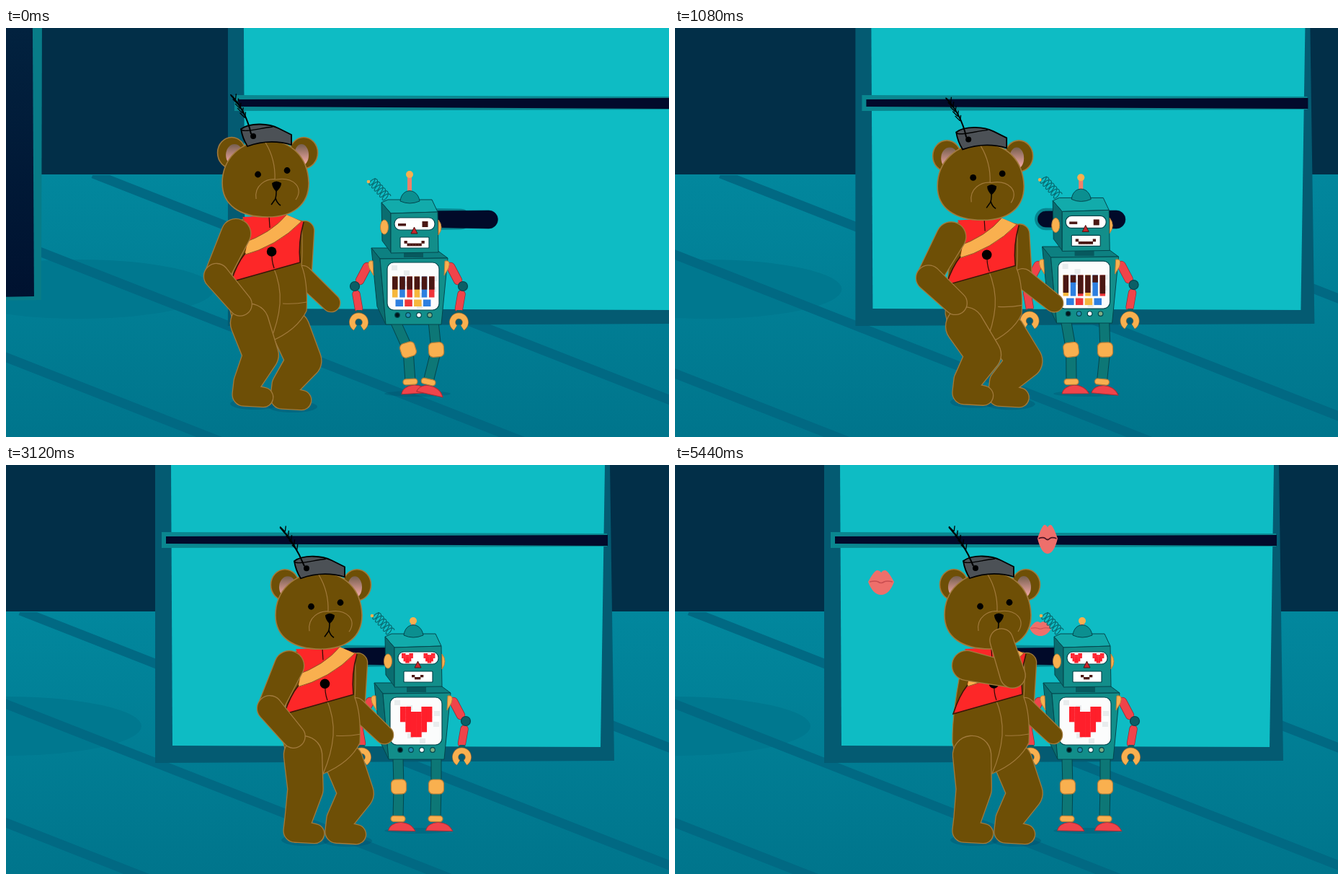
An HTML page with a canvas that plays this animation: 920 px wide and 567 px high, repeating every 5480 ms.

```html
<!DOCTYPE html>
<html lang="en">
<head>
<meta charset="utf-8">
<title>Bear and robot</title>
<style>
html, body { margin: 0; width: 100%; height: 100%; overflow: hidden; background: #022f48; }
canvas { display: block; }
</style>
</head>
<body>
<canvas id="stage" width="920" height="567"></canvas>
<script>
const c = document.getElementById('stage').getContext('2d');
const LOOP = 5480, HEARTS_AT = 2100, TAU = Math.PI * 2;
const FUR = '#6e4f06', SEAM = '#a17a3c', TEAL = '#128e8a', DARK = '#0a6d70', INK = '#04464d',
  GOLD = '#f9b04f', RIM = '#b9803a', RED = '#f0444a', BROWN = '#4a1713', HEART = '#ff1f2b';

// ---- motion ----
const clamp = u => Math.max(0, Math.min(1, u));
function ramp(t, from, to) {
  const u = clamp((t - from) / (to - from));
  return u * u * (3 - 2 * u);
}
const mix = (a, b, u) => a + (b - a) * u;
const mixPoint = (p, q, u) => [mix(p[0], q[0], u), mix(p[1], q[1], u)];

// middle joint of a two-bone limb of lengths a and b; side picks the bend
function bend([x, y], [X, Y], a, b, side) {
  const dx = X - x, dy = Y - y, d = Math.min(Math.hypot(dx, dy), a + b);
  const along = (a * a - b * b + d * d) / (2 * d);
  const out = side * Math.sqrt(Math.max(0, a * a - along * along));
  return [x + (dx * along - dy * out) / d, y + (dy * along + dx * out) / d];
}

// ---- drawing helpers ----
function draw(path, fill, stroke, width = 1.2) {
  if (typeof path === 'string') path = new Path2D(path);
  if (fill) { c.fillStyle = fill; c.fill(path); }
  if (stroke) { c.strokeStyle = stroke; c.lineWidth = width; c.stroke(path); }
}
function oval(x, y, rx, ry, fill, stroke, width) {
  const p = new Path2D();
  p.ellipse(x, y, rx, ry, 0, 0, TAU);
  draw(p, fill, stroke, width);
}
const dot = (x, y, r, fill, stroke) => oval(x, y, r, r, fill, stroke);
function box(x, y, w, h, r, fill, stroke) {
  const p = new Path2D();
  p.roundRect(x, y, w, h, r);
  draw(p, fill, stroke);
}
function rect(x, y, w, h, fill) { c.fillStyle = fill; c.fillRect(x, y, w, h); }
function line(x1, y1, x2, y2, color, width) { draw(`M${x1},${y1}L${x2},${y2}`, null, color, width); }
const poly = (pts, fill, stroke, width) => draw(`M${pts}Z`, fill, stroke, width);
function fade(y1, y2, from, to) {
  const g = c.createLinearGradient(0, y1, 0, y2);
  g.addColorStop(0, from);
  g.addColorStop(1, to);
  return g;
}

// tapered limb through [x, y, radius] joints, outlined as one shape
function limb(joints, fill = FUR, stroke = SEAM, width = 1.3) {
  const p = new Path2D();
  for (let i = 1; i < joints.length; i++) {
    const [x, y, r] = joints[i - 1], [X, Y, R] = joints[i];
    const a = Math.atan2(Y - y, X - x);
    const b = Math.acos(Math.max(-1, Math.min(1, (r - R) / Math.hypot(X - x, Y - y))));
    const q = new Path2D();
    q.arc(x, y, r, a + b, a - b + TAU);
    q.arc(X, Y, R, a - b, a + b);
    q.closePath();
    p.addPath(q);
  }
  draw(p, null, stroke, width * 2);
  draw(p, fill);
}
function pixels(rows, x, y, w, h, color) {
  rows.forEach((row, j) => [...row].forEach((on, i) => {
    if (on === '#') rect(x + i * w, y + j * h, w + .3, h + .3, color);
  }));
}
const HEART_ROWS = ['##..##', '######', '######', '.####.', '.####.', '..##..'];

// ---- room ----
function room(t) {
  const pan = t < 1520 ? mix(101, 20, t / 1520) : 20 * clamp((2300 - t) / 780) ** 2;
  rect(0, 0, 920, 204, '#022f48');
  rect(0, 203, 920, 364, fade(203, 567, '#02879d', '#00758c'));
  c.save();
  c.translate(pan, 0);
  oval(0, 362, 188, 41, '#00788f');
  c.save();
  c.beginPath();
  c.rect(-110, 204, 1040, 363);
  c.clip();
  for (const x of [-750, -330, 20, 436]) line(x, 202, x + 1000, 594, '#016983', 13);
  c.restore();
  poly('-120,0 -51,0 -52,377 -120,378', '#087c88');
  poly('-120,0 -64,0 -62,372 -120,373', fade(0, 372, '#02223f', '#001230'));
  poly('207,0 838,0 844,410 207,413', '#045b72');
  poly('229,0 831,0 825,391 231,389', '#0ebcc4');
  poly('216,93 834,95 834,113 216,115', '#0a8790');
  poly('222,99 835,97 835,112 222,109', '#020a2b');
  limb([[471, 265, 15], [530, 265, 14]], '#078590', '#078590', .3);
  limb([[471, 265, 11], [569, 265.5, 12.5]], '#010a29', '#010a29', .3);
  c.restore();
}

// ---- robot ----
function robotLeg(hip, knee, ankle) {
  for (const [color, width] of [[INK, 15], ['#0d7776', 13]]) {
    draw(`M${hip},406L${knee},446L${ankle},490`, null, color, width);
  }
  c.save();
  c.translate(knee, 446);
  c.rotate((hip - knee) / 60);
  box(-10.5, -10, 21, 20, 6, GOLD, RIM);
  c.restore();
  c.save();
  c.translate(ankle, 491);
  c.rotate((knee - ankle) / 50);
  draw('M-13,16C-11,2 16,-1 24,16Z', RED, '#b02c35', 1);
  box(-10, -4.5, 20, 8, 4, GOLD, RIM);
  c.restore();
}
function robotArm(side) {
  const x = 563 + side * 51, elbow = x + side * 24, claw = x + side * 18.5;
  limb([[x + side * 7, 328, 5.5], [elbow - side * 7, 347, 5.5]], RED, '#8e2c35', .7);
  limb([[elbow - side * 2, 366, 5], [claw, 386, 5]], RED, '#8e2c35', .7);
  draw(`M${x - side},320Q${x + side * 8},318 ${x + side * 4},330L${x - side * 2},340Z`, GOLD, RIM, 1);
  dot(elbow, 355, 6.5, '#0b5f66', INK);
  poly(`${claw - 7},396 ${claw - 3},388 ${claw + 4},388 ${claw + 7},396`, '#0b5f66');
  const ring = new Path2D();
  ring.arc(claw, 405, 9, TAU * .34, TAU * 1.16);
  draw(ring, null, '#8d6a3c', 9);
  draw(ring, null, GOLD, 7.5);
}
function screen(t, love) {
  box(533, 322, 72, 66, 9, '#fbfcfc', INK);
  for (let i = 0; i < 9; i++) rect(539 + i * 37 % 56, 326 + i * 23 % 54, 8, 7, '#e8eced');
  if (love) return pixels(HEART_ROWS, 547, 335, 7.35, 7, HEART);
  const hues = ['#f6b73c', '#2d7fe0', '#f0353a'];
  for (let i = 0; i < 6; i++) {
    const x = 540 + i * 10.2, h = 18 + 8 * Math.sin(t / 150 * (1 + i % 3 / 2));
    rect(x, 341.5, 7.5, 29, hues[i % 3]);
    rect(x, 341.5, 7.5, h, BROWN);
    if (i < 4) rect(544.5 + i * 12.8, 373.5, 10.5, 9.5, hues[(i + 1) % 3]);
  }
}
function spring() {
  const p = new Path2D();
  for (let k = 0; k <= 100; k++) {
    const u = k / 100, a = u * TAU * 6;
    p.lineTo(512 + u * 22 + 5 * Math.cos(a), 207 + u * 25 + 4.5 * Math.sin(a) - 3 * Math.cos(a));
  }
  draw(p, null, '#07656b', 1.1);
  dot(508, 209, 2.3, GOLD);
}
function robotHead(love, ball) {
  spring();
  poly('526,238 535,234 596,234 604,251 539,253', '#12abab', INK, 1);
  poly('526,238 539,253 539,307 527,291', DARK, INK, 1);
  poly('539,253 604,251 605,307 539,308', TEAL, INK, 1);
  oval(530, 272, 5.5, 10, GOLD, RIM, 1);
  draw('M605,262Q613,272 605,283Z', GOLD, RIM, 1);
  line(565, ball, 565, 226, '#ef806a', 6);
  dot(565, ball, 5, GOLD);
  draw('M552,236C554,217 576,217 579,236Q565,242 552,236Z', '#0b8f90', INK, 1);
  box(544, 259, 56, 17, 8, '#fff', INK);
  box(552, 286, 40, 15, 1, '#fff', INK);
  if (love) {
    for (const x of [549, 579.5]) pixels(HEART_ROWS, x, 261, 2.6, 2.2, HEART);
    pixels(['#..#', '.##.'], 563, 291, 4, 3, BROWN);
  } else {
    rect(549, 267, 11, 3.5, BROWN);
    rect(582.5, 264, 8, 8, BROWN);
    pixels(['#.....#', '.#####.'], 557.5, 291, 4, 3.5, BROWN);
  }
  poly('571.5,272 576,281 567,281', '#c9252c', BROWN, 1);
}
function robot(t) {
  const love = t >= HEARTS_AT;
  const sway = Math.cos(TAU * t / 510) * clamp(1 - t / 2100);
  const fore = Math.max(sway, 0), back = Math.max(-sway, 0), lift = Math.abs(sway);
  oval(571, 507, 46, 4, 'rgba(0,70,95,.25)');
  robotLeg(544 - 4 * sway, 545 + 13 * fore + 7 * back, 544 + 17 * fore);
  robotLeg(597 - 4 * sway, 597 + 24 * back, 596 - 10 * sway);
  c.save();
  c.translate(-4 * sway, 3 * lift);
  poly('511,302 598,302 617,316 523,317', '#0d8081', INK, 1);
  rect(556, 306, 27, 9, '#07595e');
  poly('511,302 523,317 531,408 519,383', DARK, INK, 1);
  poly('523,317 617,316 608,408 531,408', TEAL, INK, 1);
  robotArm(-1);
  robotArm(1);
  screen(t, love);
  ['#02161c', '#248fb5', '#fff', '#80ad84'].forEach((k, i) => dot(547 + i * 15, 395, 3.3, k, INK));
  c.translate(-sway, lift);
  robotHead(love, 216 - 17 * Math.sqrt(lift));
  c.restore();
}

// ---- bear ----
function bearLeg(hip, [ax, ay]) {
  const knee = bend(hip, [ax, ay], 47, 42, -1);
  limb([[...hip, 26], [...knee, 24], [ax, ay, 18.5], [ax - 5, ay + 17, 15.5], [ax + 22, ay + 21, 13]]);
}
function torso() {
  draw('M402,258L484,260Q486,300 484,322Q493,345 491,385Q478,412 440,428Q390,420 385,385Q384,340 402,258Z', FUR, SEAM);
  draw('M444,322Q456,350 454,375Q452,400 440,428M458,375Q475,376 491,373', null, SEAM);
  const vest = new Path2D('M402,255L463,252L487,262Q479,290 482,318L386,345Q394,320 406,305L412,275Z');
  draw(vest, '#fd2728');
  c.save();
  c.clip(vest);
  draw('M464,251Q442,278 400,292L400,309Q450,296 484,261Z', GOLD, '#8f5526', 1);
  c.restore();
  draw('M487,262Q479,290 482,318L386,345Q394,320 406,305', null, '#3a1608', 1.6);
  draw('M439,255L440,270M443,303Q442,315 446,326', null, '#2a0b05');
  dot(442.5, 303, 6.8, '#000');
}
function hat(sway) {
  draw('M400,133C414,123 440,126 452,132L470,141L470,155Q440,146 409,157Q402,146 400,133Z', '#4c5156', '#000', 1.8);
  draw('M400,133C402,139 425,132 444,130', null, '#000', 1.4);
  dot(417, 143, 4, '#000');
  const tip = 380 + 6 * sway;
  draw(`M414,140Q${tip + 21},108 ${tip},86`, null, '#000', 2);
  for (let i = 1; i < 6; i++) {
    const [x, y] = mixPoint([tip, 86], [409, 130], i / 7);
    draw(`M${x + 3},${y}l-7,-7m7,7l1,-8`, null, '#000', 1.3);
  }
}
function bearHead(sway) {
  for (const [x, inner, width] of [[387, 391, 12], [487, 484, 10]]) {
    oval(x, 166, 19.5, 21.5, FUR, SEAM, 1.6);
    oval(inner, 169, width, 15, fade(152, 184, '#6d5a48', '#ffb0ae'));
  }
  draw('M436,149C470,149 493,172 494,208C494,238 472,255 437,255C398,255 374,238 374,208C374,174 400,149 436,149Z', FUR, SEAM, 1.6);
  draw('M434,152Q448,175 447,203M421,230C418,211 435,201 449,203C472,199 488,214 476,231', null, SEAM);
  dot(423.5, 196, 4.4, '#000');
  dot(464, 190.5, 4.4, '#000');
  draw('M443,208Q449,203 456,208Q456,214 449,220Q443,214 443,208Z', '#000');
  draw('M449,218Q449,228 447,231L442,238M448,229Q450,236 455,239', null, '#000', 1.5);
  hat(sway);
}
function bear(t) {
  const dip = t < 1690 ? Math.sin(Math.PI * t / 338) ** 2 : 0;
  const settle = ramp(t, 1690, 3300), toMouth = ramp(t, 4730, 5020);
  const raise = ramp(t, 3300, 3840) - ramp(t, 4440, 5020);
  const wave = 40 * Math.sin(Math.PI * clamp((t - 3840) / 600));

  const foot = (wide, low, still) => mixPoint(mixPoint(wide, low, dip), still, settle);
  const left = foot([409, 484], [429, 464], [406, 490]);
  const right = foot([462, 488], [472, 464], [464, 491]);

  const shoulder = [393 + 12 * toMouth, 278];
  const hand = mixPoint([399, 376 - 18 * dip], [453, 243], toMouth);
  const elbow = bend(shoulder, hand, 65, 51, 1);

  const farShoulder = [488, 274];
  const farHand = mixPoint([525 + 32 * dip, 374 - 12 * dip], [586, 233 - wave], raise);
  const farElbow = bend(farShoulder, farHand, 62, 55, 1);

  c.save();
  c.translate(-74 * clamp(1 - t / 1700) ** 2, 7 * (1 - settle) + 13 * dip);
  for (const [x, y] of [left, right]) oval(x + 10, y + 30, 34, 8, 'rgba(0,70,100,.3)');
  limb([[...farShoulder, 13], [...farElbow, 12]]);
  limb([[...farElbow, 13], [...farHand, 12]]);
  bearLeg([469, 411], right);
  torso();
  bearLeg([412, 402], left);
  limb([[...shoulder, 20], [...elbow, 16.5]]);
  bearHead(1 - settle);
  limb([[...elbow, 17], [...hand, 15.5]]);
  c.restore();
}

// ---- kisses ----
function kiss(t, start, x, y, w, h, seam) {
  const s = ramp(t, start, start + 120);
  if (!s) return;
  c.save();
  c.translate(x, y);
  c.scale(s * w / 36, s * h / 34);
  draw('M-18,-1C-13,-10 -9,-17 -5,-17Q-2,-17 0,-14Q2,-17 5,-17C9,-17 13,-10 18,-1C14,10 8,17 0,17C-8,17 -14,10 -18,-1Z', '#ee6f6b');
  draw('M-16,-1Q-8,-3 -4,-1Q0,2 4,-1Q8,-3 16,-1', null, seam, 1.6);
  c.restore();
}

function frame() {
  const t = performance.now() % LOOP;
  room(t);
  kiss(t, 4900, 286, 163, 36, 34, '#c94d50');
  kiss(t, 4940, 517, 103, 28, 40, '#4c1424');
  kiss(t, 4980, 507, 227, 30, 20, '#c94d50');
  robot(t);
  bear(t);
  requestAnimationFrame(frame);
}
frame();
</script>
</body>
</html>
```
